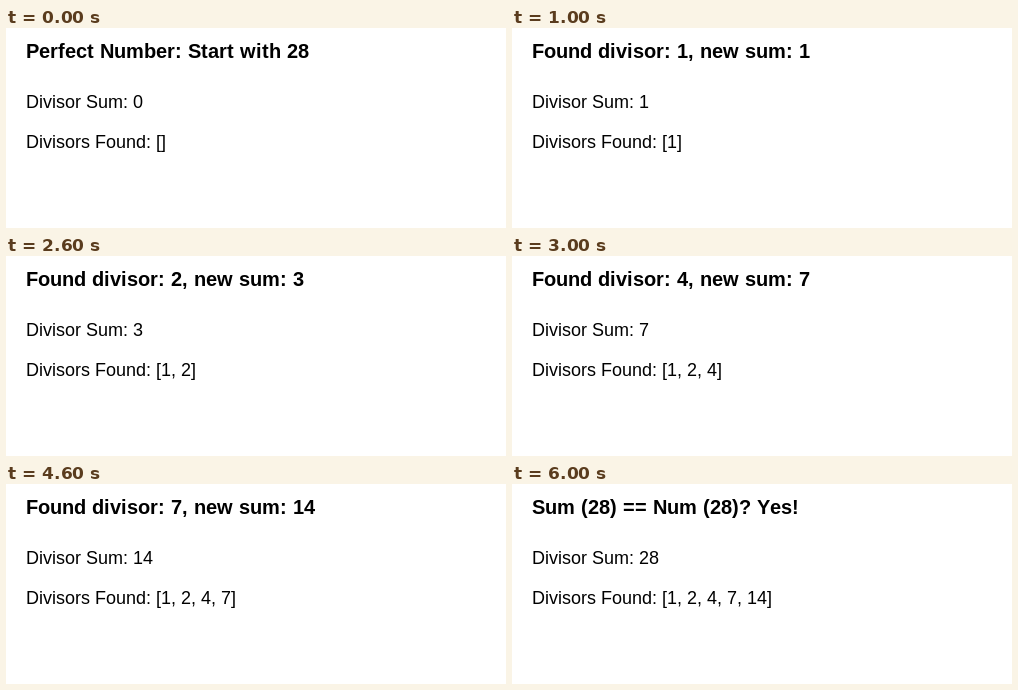
An HTML page that plays this animation: 500x200 px, repeating every 7000 ms.

```html
<!DOCTYPE html>
<html lang="en">
<head>
<meta charset="utf-8">
<title>Perfect number check</title>
<style>
  html, body { margin: 0; width: 100%; height: 100%; overflow: hidden; background: #fff; }
  svg { display: block; width: 500px; height: 200px; }
  text { font: 18px "Liberation Sans", Arial, sans-serif; font-kerning: none; fill: #000; }
  #head { font-weight: bold; font-size: 20px; }
</style>
</head>
<body>
<svg viewBox="0 0 500 200">
  <text id="head" y="30"></text>
  <text id="sum" y="80"></text>
  <text id="list" y="120"></text>
</svg>
<script>
const NUM = 28, STEP = 1000, LEFT = 20;
const pen = document.createElement('canvas').getContext('2d');

// Each glyph advances by a whole number of pixels.
function write(id, str) {
  const el = document.getElementById(id);
  const style = getComputedStyle(el);
  pen.font = `${style.fontWeight} ${style.fontSize} ${style.fontFamily}`;
  let x = LEFT;
  const xs = [...str].map(ch => {
    const at = x;
    x += Math.round(pen.measureText(ch).width);
    return at;
  });
  el.setAttribute('x', xs.join(' '));
  el.textContent = str;
}

function buildSteps() {
  const found = [];
  let sum = 0;
  const steps = [];
  const add = head => steps.push({ head, sum, list: `[${found.join(', ')}]` });
  add(`Perfect Number: Start with ${NUM}`);
  for (let d = 1; d < NUM; d++) {
    if (NUM % d) continue;
    sum += d;
    found.push(d);
    add(`Found divisor: ${d}, new sum: ${sum}`);
  }
  add(`Sum (${sum}) == Num (${NUM})? ${sum === NUM ? 'Yes' : 'No'}!`);
  return steps;
}

const steps = buildSteps();
let shown = -1;

function render(ms) {
  const i = Math.floor(ms / STEP) % steps.length;
  if (i === shown) return;
  shown = i;
  const s = steps[i];
  write('head', s.head);
  write('sum', `Divisor Sum: ${s.sum}`);
  write('list', `Divisors Found: ${s.list}`);
}

const start = performance.now();
function tick() {
  render(performance.now() - start);
  requestAnimationFrame(tick);
}
tick();
</script>
</body>
</html>
```
